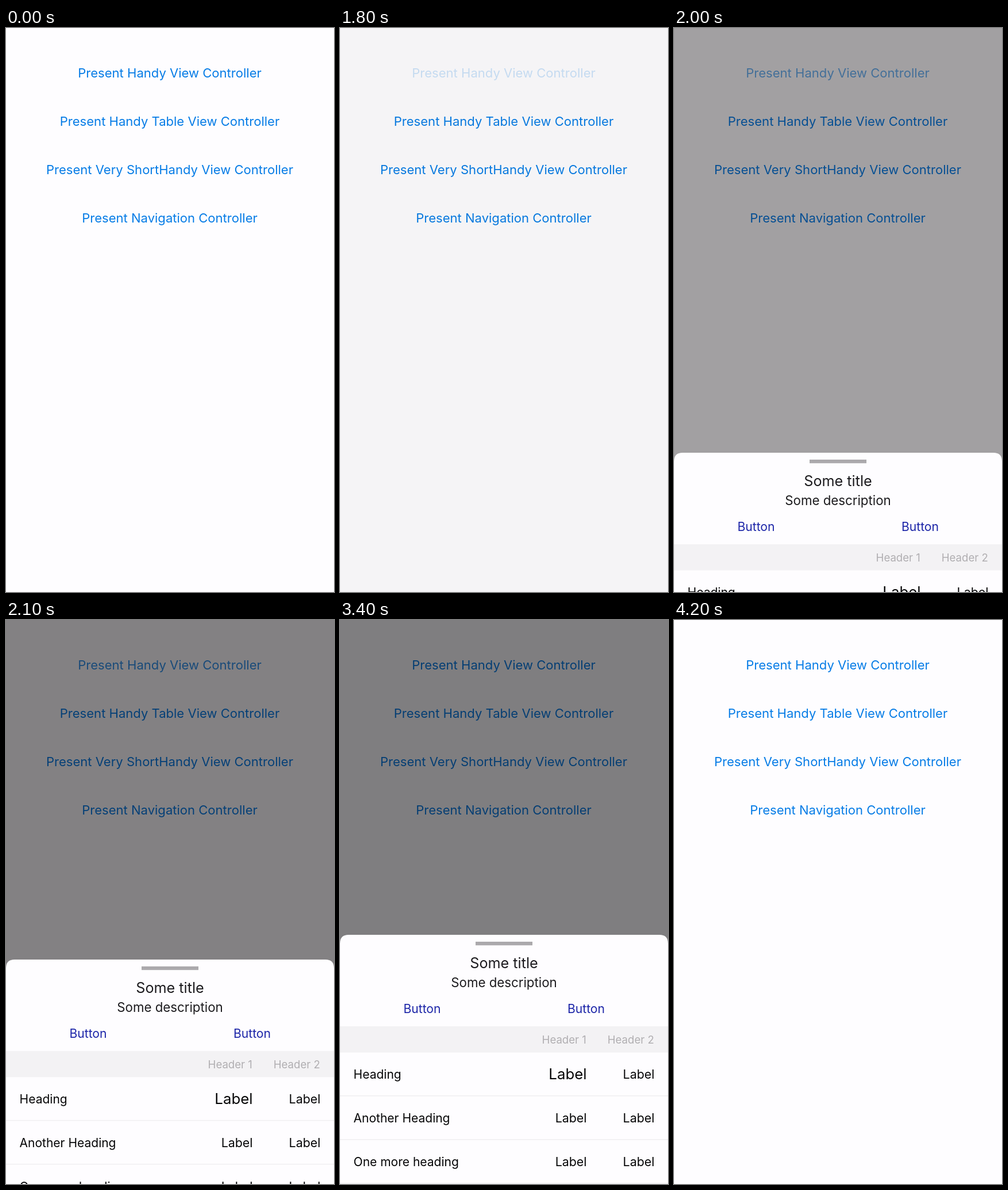
An HTML page for the animation above (4.6 s loop, 571 by 980 pixels).

```html
<!DOCTYPE html>
<html lang="en">
<head>
<meta charset="utf-8">
<title>Bottom sheet</title>
<style>
  html, body { margin: 0; width: 100%; height: 100%; overflow: hidden; background: #fefdff; }
  svg { display: block; width: 571px; height: 980px; }
  text { font-family: Inter, Roboto, "Liberation Sans", sans-serif; }
</style>
</head>
<body>
<svg id="stage" viewBox="0 0 571 980">
  <rect width="571" height="980" fill="#fefdff"/>
  <g id="menu"></g>
  <rect id="dim" width="571" height="980" fill="#030103"/>
  <g id="sheet">
    <path d="M0 450V15Q0 0 15 0H556Q571 0 571 15V450Z" fill="#fefdff"/>
    <rect x="236" y="12" width="99" height="6.3" fill="#aba9ac"/>
    <rect y="159" width="571" height="45.5" fill="#f3f2f4"/>
  </g>
</svg>
<script>
const LOOP = 4600, STEP = 100;
const OPEN_Y = 547, CLOSED_Y = 980;
const NS = "http://www.w3.org/2000/svg";
const [menu, dim, sheet] = ["menu", "dim", "sheet"].map(id => document.getElementById(id));

function add(parent, tag, attrs, content = "") {
  const el = document.createElementNS(NS, tag);
  for (const key in attrs) el.setAttribute(key, attrs[key]);
  el.textContent = content;
  return parent.appendChild(el);
}

function label(parent, content, x, y, size, fill, anchor = "middle") {
  return add(parent, "text", { x, y, "font-size": size, fill, "text-anchor": anchor }, content);
}

const links = [
  "Present Handy View Controller",
  "Present Handy Table View Controller",
  "Present Very ShortHandy View Controller",
  "Present Navigation Controller"
].map((name, i) => label(menu, name, 285, 86 + 84 * i, 22.05, "#067ce6"));

label(sheet, "Some title", 285.5, 58, 25.2, "#1c1b1e");
label(sheet, "Some description", 285.5, 91, 22.3, "#1c1b1e");
for (const x of [143, 428.5]) label(sheet, "Button", x, 136, 21.1, "#1c25a8");
label(sheet, "Header 1", 428.9, 189, 18.6, "#b0aeb1", "end");
label(sheet, "Header 2", 546.8, 189, 18.6, "#b0aeb1", "end");

["Heading", "Another Heading", "One more heading"].forEach((name, i) => {
  const y = 249.7 + 76 * i;
  label(sheet, name, 23.6, y, 21, "#050506", "start");
  label(sheet, "Label", 429.5, i ? y : y + 1.4, i ? 21.4 : 25.8, "#050506", "end");
  label(sheet, "Label", 547.4, y, 21.4, "#050506", "end");
  add(sheet, "rect", { y: 279 + 76 * i, width: 571, height: 1.5, fill: "#f0eff1" });
});

const span = (t, start, length) => Math.min(1, Math.max(0, (t - start) / length));
const easeOut = p => 1 - (1 - p) ** 3;
const easeInOut = p => p * p * (3 - 2 * p);

function draw(t) {
  const shade = easeInOut(span(t, 1735, 400)) - easeInOut(span(t, 3415, 305));
  const raise = easeOut(span(t, 1920, 335)) - easeInOut(span(t, 3460, 400));
  const y = CLOSED_Y + (OPEN_Y - CLOSED_Y) * raise;
  dim.setAttribute("opacity", 0.5 * shade);
  sheet.setAttribute("transform", `translate(0 ${y.toFixed(2)})`);
  // The pressed link drops to 20% and fades back on release.
  links[0].setAttribute("opacity", t < 1700 ? 1 : 0.2 + 0.8 * span(t, 1830, 340));
}

function tick() {
  const t = performance.now() % LOOP;
  draw(Math.floor(t / STEP) * STEP);
  requestAnimationFrame(tick);
}
tick();
</script>
</body>
</html>
```
